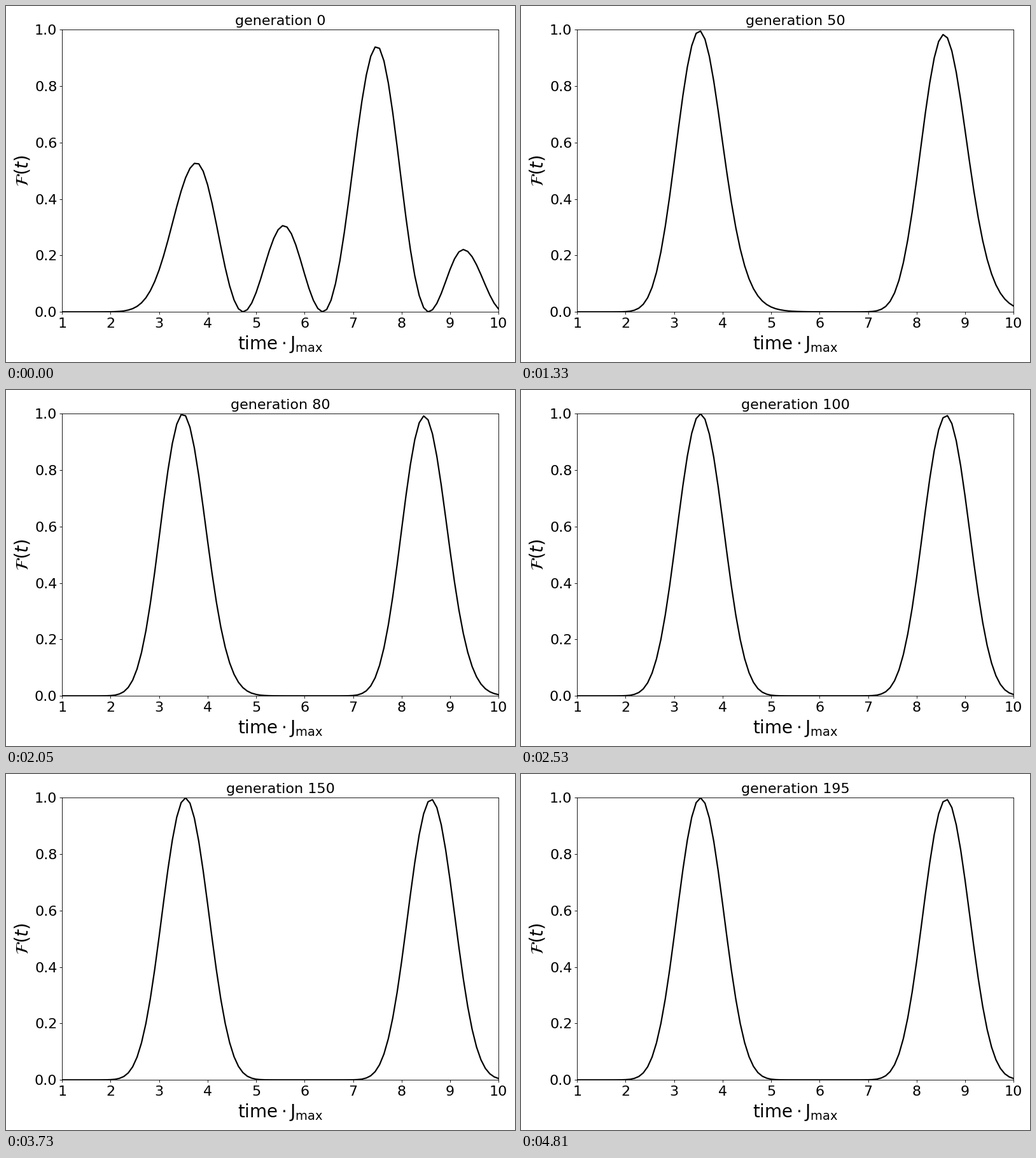
Animation of 800x560 px, one loop 4930 ms. Source, as a matplotlib script:

```python
import numpy as np
import matplotlib.pyplot as plt
from matplotlib.animation import FuncAnimation

W, H, DPI = 800, 560, 80
LEFT, RIGHT, TOP, BOTTOM = 88.2, 774.2, 37.0, 481.2   # axes box, px from top left
TICK, FIRST, HOLD, LOOP = 10, 250, 120, 4930          # ms
GEN_STEP = 5

plt.rcParams["font.family"] = "DejaVu Sans"
plt.rcParams["mathtext.fontset"] = "dejavusans"

t = np.linspace(1, 10, 100)

# The search overshoots once, then settles on two pulses
KEY_GENS = [30, 65, 100]
CENTRES = [3.61, 3.452, 3.543], [8.83, 8.36, 8.61]
HEIGHTS = [.992, .999, .999], [.973, .99, .994]
STEEP = [2.05, 2.4, 2.2]
TAIL = [-.1, -.1, .13]

# Starting curve: peaks and zeros alternate
TURNS = [3.77, 4.73, 5.57, 6.38, 7.49, 8.55, 9.27, 10.12]
PEAKS = np.array([.528, .306, .941, .221, 0])


def at(gen, keys):
    return np.interp(gen, KEY_GENS, keys)


def pulse(x, centre, height, steep, tail, rise=.15):
    """Bell whose sides are thinner (positive) or heavier than a Gaussian."""
    d2 = (x - centre) ** 2
    q = np.where(x < centre, rise, tail)
    bend = (1 + np.abs(q) * d2) ** np.sign(q)
    return height * np.exp(-steep * d2 * bend)


def start_curve(x):
    phase = np.interp(x, TURNS, np.arange(len(TURNS)))
    peak = ((phase + 1) // 2).astype(int)
    height = PEAKS[peak]
    u = np.abs(phase - 2 * peak)
    u += .12 * height * u * (1 - u)      # taller waves are narrower
    waves = height * np.cos(u * np.pi / 2) ** 2
    return np.where(x < TURNS[0], pulse(x, TURNS[0], PEAKS[0], 2.1, 0, .03), waves)


def pulse_pair(x, gen):
    return sum(pulse(x, at(gen, c), at(gen, h), at(gen, STEEP), at(gen, TAIL))
               for c, h in zip(CENTRES, HEIGHTS))


def fidelity(gen):
    """Slide the two tallest starting waves onto the pulses while blending."""
    s = 1 - max(0, 1 - gen / KEY_GENS[0]) ** 2
    old = np.array([0, TURNS[0], TURNS[4], 12])
    new = np.array([0, at(gen, CENTRES[0]), at(gen, CENTRES[1]), 12])
    now = (1 - s) * old + s * new
    return ((1 - s) * start_curve(np.interp(t, now, old))
            + s * pulse_pair(np.interp(t, now, new), gen))


fig = plt.figure(figsize=(W / DPI, H / DPI), dpi=DPI, facecolor="white")
ax = fig.add_axes([LEFT / W, 1 - BOTTOM / H, (RIGHT - LEFT) / W, (BOTTOM - TOP) / H])
ax.set(xlim=(1, 10), ylim=(0, 1), xticks=[], yticks=[])

# Plain tick artists keep each redraw quick
xs, ys = np.arange(1, 11), np.linspace(0, 1, 6)
marks = dict(ls="none", color="k", ms=3.5, mew=.8, clip_on=False)
ax.plot(xs, 0 * xs, marker=3, **marks)
ax.plot(0 * ys + 1, ys, marker=0, **marks)
trans, va, ha = ax.get_xaxis_text1_transform(7.5)
for x in xs:
    ax.text(x, 0, str(x), size=20, transform=trans, va=va, ha=ha)
trans, va, ha = ax.get_yaxis_text1_transform(7)
for y in ys:
    ax.text(0, y, f"{y:.1f}", size=20, transform=trans, va=va, ha=ha)

fig.text(431.2 / W, 12 / H, r"$\mathrm{time}\cdot\mathrm{J_{max}}$",
         size=25, ha="center", va="bottom")
fig.text(12 / W, 300.8 / H, r"$\mathcal{F}(t)$",
         size=25, rotation=90, ha="left", va="center")

title = ax.set_title("generation 0", size=20)
line, = ax.plot(t, fidelity(0), color="k", lw=2)


def update(k):
    gen = GEN_STEP * max(0, (k * TICK - FIRST) // HOLD + 1)
    title.set_text(f"generation {gen}")
    line.set_ydata(fidelity(gen))
    return line, title


anim = FuncAnimation(fig, update, frames=LOOP // TICK, interval=TICK,
                     repeat=True, repeat_delay=0, blit=False)
plt.show()
```
